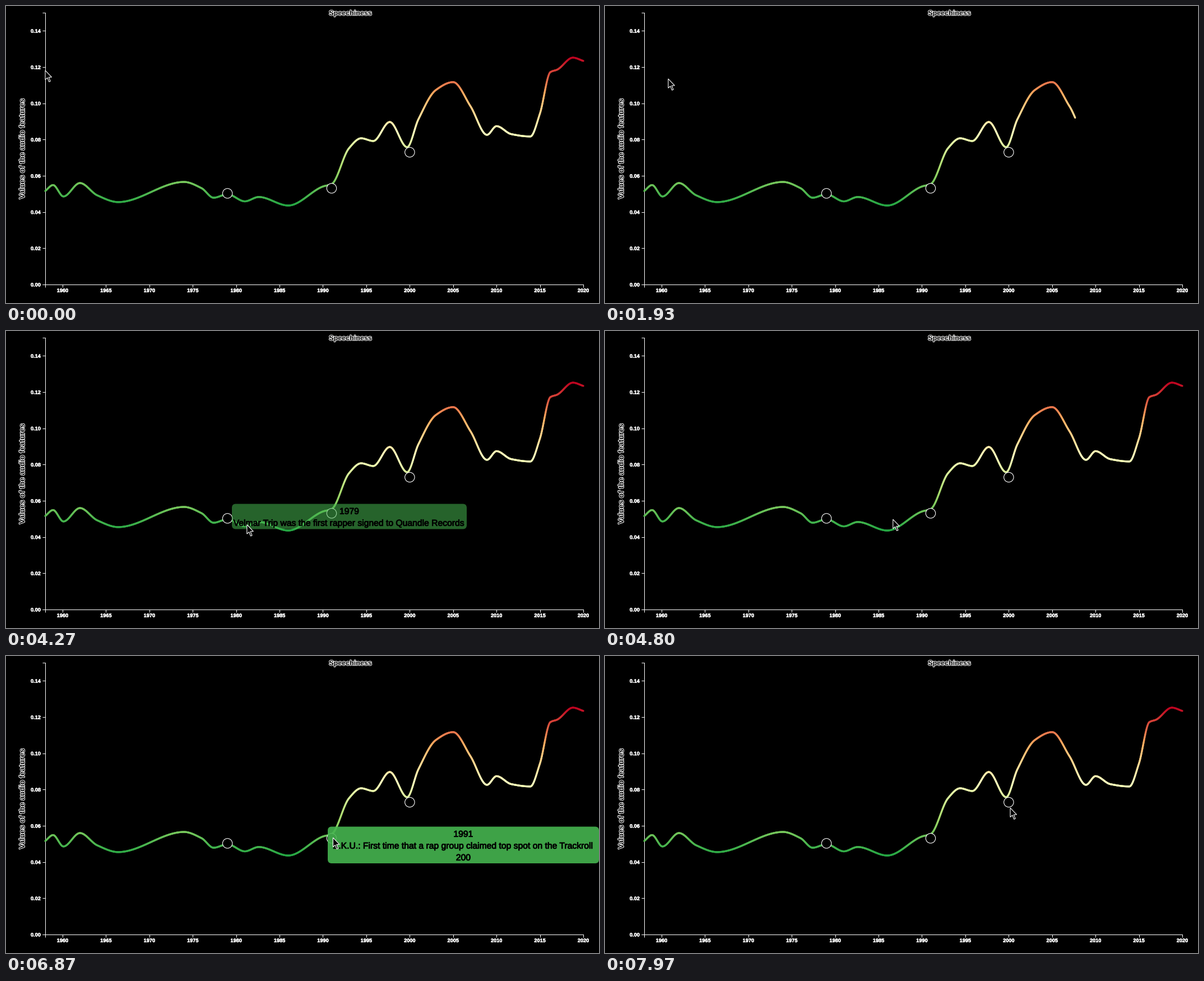
A matplotlib script that plays this animation: 1058 px wide and 530 px high, repeating every 8000 ms.

```python
import numpy as np
import matplotlib.pyplot as plt
from matplotlib.animation import FuncAnimation
from matplotlib.collections import LineCollection
from matplotlib.colors import LinearSegmentedColormap
from matplotlib.patches import Circle, FancyBboxPatch, Polygon
from matplotlib.patheffects import withStroke

W, H, DPI = 1058, 530, 100
PX = 72 / DPI  # points per pixel
LOOP, STEP = 8000, 40
LEFT, RIGHT, TOP, BOTTOM = 70, 1030, 12, 497

plt.rcParams["font.family"] = "Liberation Sans"

fig = plt.figure(figsize=(W / DPI, H / DPI), dpi=DPI, facecolor="black")
ax = fig.add_axes([0, 0, 1, 1])
ax.set_xlim(0, W)
ax.set_ylim(H, 0)
ax.axis("off")


def year_x(year):
    return LEFT + (year - 1958) * (RIGHT - LEFT) / 62


def value_y(value):
    return BOTTOM - value * (BOTTOM - TOP) / 0.15


def label(x, y, text, size, color, edge, edge_width, **kw):
    stroke = withStroke(linewidth=edge_width * PX, foreground=edge)
    kw = {"ha": "center", "va": "baseline", "weight": "bold"} | kw
    return ax.text(x, y, text, fontsize=size * PX, color=color,
                   path_effects=[stroke], **kw)


def tick_label(x, y, text, **kw):
    label(x, y, text, 9.2, "white", "white", 0.4, **kw)


def caption(x, y, text, size, **kw):
    label(x, y, text, size, "black", "white", 2, **kw)


def rule(xs, ys):
    ax.plot(xs, ys, color="white", lw=PX, solid_capstyle="butt")


def cubic_ease(t):
    t = np.clip(t, 0, 1)
    return 4 * t**3 if t < 0.5 else 1 - 4 * (1 - t) ** 3


# Axes, ticks and captions
rule([65, LEFT, LEFT, 65], [TOP, TOP, BOTTOM, BOTTOM])
rule([LEFT, LEFT, RIGHT, RIGHT], [BOTTOM + 5, BOTTOM, BOTTOM, BOTTOM + 5])
for value in np.arange(8) * 0.02:
    y = value_y(value)
    rule([65, LEFT], [y, y])
    tick_label(62, y + 3.5, f"{value:.2f}", ha="right")
for year in range(1960, 2021, 5):
    x = year_x(year)
    rule([x, x], [BOTTOM, BOTTOM + 5])
    tick_label(x, 510.7, str(year))
caption(614.5, 16.5, "Speechiness", 12.5)
caption(33, 254.5, "Values of the audio features", 13.5,
        rotation=90, rotation_mode="anchor")

# Turning points of the curve: year, value in thousandths
turns = np.array([
    (1958, 51.6), (1958.9, 54.9), (1960.1, 48.6), (1962, 56), (1964, 49.2),
    (1966.4, 45.5), (1974, 56.6), (1976, 53.2), (1977.4, 47.9), (1979, 49.8),
    (1981, 45.9), (1982.6, 48.3), (1986, 43.6), (1990, 54.1), (1991, 55.4),
    (1993, 75.2), (1994.4, 80.7), (1995.8, 79.2), (1997.7, 89.7),
    (1999.7, 75.8), (2001, 91.2), (2003, 107.3), (2005, 111.7), (2007, 98.4),
    (2008.9, 82.6), (2010, 87.4), (2011.7, 83), (2013.9, 81.7), (2015, 94.3),
    (2016.2, 117.2), (2017, 118.6), (2018.8, 125.2), (2020, 123.4)])


def monotone(xs, ys, x):
    """Cubic curve that is level at every peak and dip."""
    gap = np.diff(xs)
    rise = np.diff(ys) / gap
    a, b = rise[:-1], rise[1:]
    slope = np.r_[rise[0], 2 * np.maximum(a * b, 0) / (a + b), rise[-1]]
    i = np.clip(np.searchsorted(xs, x) - 1, 0, len(gap) - 1)
    t = (x - xs[i]) / gap[i]
    return (ys[i] + (ys[i + 1] - ys[i]) * t * t * (3 - 2 * t)
            + gap[i] * t * (1 - t) * (slope[i] * (1 - t) - slope[i + 1] * t))


years = np.linspace(1958, 2020, 1000)
values = monotone(*turns.T, years) / 1000
curve = np.column_stack([year_x(years), value_y(values)])
steps = np.hypot(*np.diff(curve, axis=0).T)
length = np.cumsum(steps) / steps.sum()
segments = np.stack([curve[:-1], curve[1:]], axis=1)

heat = LinearSegmentedColormap.from_list(
    "heat", ["#25a643", "#a6d96a", "#ffffbf", "#fdae61", "#bd0420"])
colors = heat((values[:-1] - 0.0436) / (0.1252 - 0.0436))

line = LineCollection([], linewidths=3.3 * PX, capstyle="round", zorder=3)
ax.add_collection(line)

for year, value in [(1979, 0.0503), (1991, 0.0531), (2000, 0.073)]:
    ax.add_patch(Circle((year_x(year), value_y(value)), 8.7, fc="black",
                        ec="white", lw=1.1 * PX, zorder=4))


class Tooltip:
    def __init__(self, x, y, w, h, lines, enter, leave):
        self.enter, self.leave = enter, leave
        self.box = FancyBboxPatch((x, y), w, h, fc="#46b54f", ec="none", zorder=5,
                                  boxstyle="round,pad=0,rounding_size=7")
        ax.add_patch(self.box)
        self.texts = [
            label(x + w / 2, y + 18.2 + 21 * i, text, 15.7, "black", "black", 0.9,
                  weight="normal", zorder=6)
            for i, text in enumerate(lines)]

    def update(self, t):
        fade_in = cubic_ease((t - self.enter) / 200)
        fade_out = cubic_ease((t - self.leave) / 500)
        alpha = 0.9 * fade_in * (1 - fade_out)
        # Black text on a black stage stays solid while the box fades
        self.box.set_alpha(alpha)
        for part in [self.box, *self.texts]:
            part.set_visible(alpha > 0)


tooltips = [
    Tooltip(403, 308.5, 419, 45,
            ["1979", "Velmar Trip was the first rapper signed to Quandle Records"],
            3080, 4010),
    Tooltip(574, 304.5, 484, 65.5,
            ["1991",
             "Z.K.U.: First time that a rap group claimed top spot on the Trackroll",
             "200"],
            5200, 6930),
]

# Mouse pointer and the places it visits: time, x, y
arrow = np.array([(0, 0), (0, 16.5), (3.8, 13), (6.7, 20.3), (9.2, 19.2),
                  (6.2, 12.2), (11.5, 12)])
visits = np.array([
    (0, 70, 115), (1930, 113, 130), (2350, 116, 133), (3080, 401, 335),
    (4000, 402, 336), (4250, 431, 346), (5200, 574, 329), (6930, 584, 324),
    (7700, 723, 271)])
pointer = Polygon(arrow, fc="black", ec="white", lw=1.1 * PX, zorder=8,
                  joinstyle="miter")
ax.add_patch(pointer)


def draw(frame):
    t = frame * STEP
    # The finished curve flashes once before it is traced again
    shown = 1 if frame == 0 else min(1, (t - 10) / 2500)
    n = np.searchsorted(length, shown) + 1
    line.set_segments(segments[:n])
    line.set_color(colors[:n])
    for tip in tooltips:
        tip.update(t)
    spot = [np.interp(t, visits[:, 0], visits[:, k]) for k in (1, 2)]
    pointer.set_xy(arrow + spot)
    return [line, pointer]


anim = FuncAnimation(fig, draw, frames=LOOP // STEP, interval=STEP,
                     repeat=True, repeat_delay=0, blit=False)
plt.show()
```
